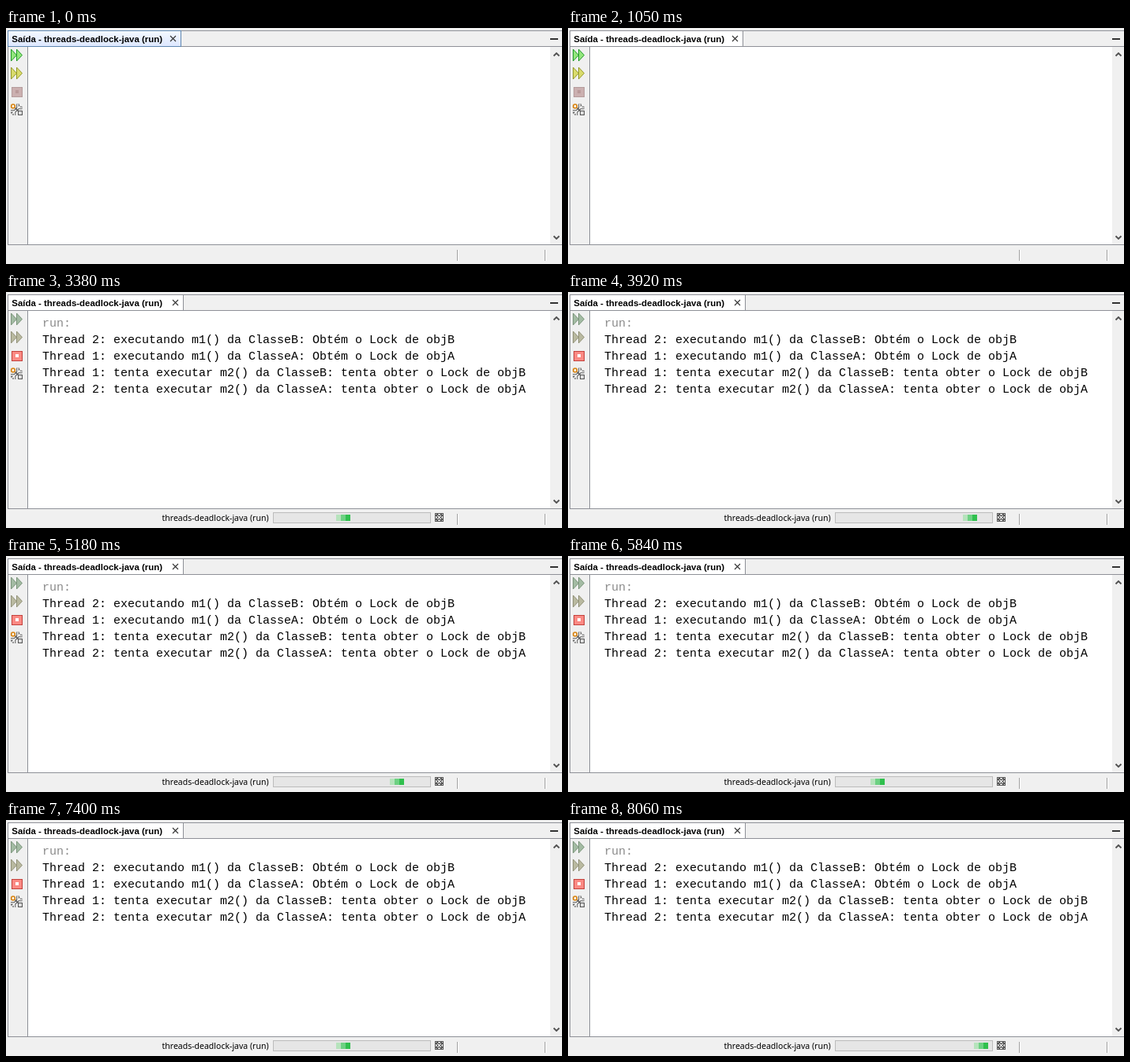
Write an HTML page that moves like this. It is 704 px wide and 300 px high and loops after 8120 ms.

```html
<!DOCTYPE html>
<html lang="pt">
<head>
<meta charset="utf-8">
<style>
  html, body { margin: 0; width: 100%; height: 100%; overflow: hidden; background: #f0f0f0; }
  svg { display: block; }
  text { white-space: pre; }
  .title { font: bold 11.45px Arial, "Liberation Sans", sans-serif; }
  .status { font: 10.5px "Noto Sans", "Open Sans", sans-serif; }
  .console { font: 15px "Courier New", "Liberation Mono", monospace; }
  .line { fill: #8e9097; }
  .go { fill: #92e67c; stroke: #1f9a28; }
  .again { fill: #d9db6c; stroke: #94992a; }
  .stop { fill: #cbb0b0; stroke: #b59c9c; }
  .hole { fill: #b99a9a; }
  .running .go { fill: #a3bba3; stroke: #7c957c; }
  .running .again { fill: #b9b9a0; stroke: #929279; }
  .running .stop { fill: #fa8a84; stroke: #c4413c; }
  .running .hole { fill: #fff; }
</style>
</head>
<body>
<svg id="stage" width="704" height="300" viewBox="0 0 704 300">
  <defs>
    <linearGradient id="focus" x2="0" y2="1">
      <stop stop-color="#f4f9ff"/><stop offset="1" stop-color="#dde7ff"/>
    </linearGradient>
    <clipPath id="track"><rect x="341" y="283" width="194" height="8"/></clipPath>
    <path id="forward" d="M6.5 .5L13.5 8L6.5 15.5ZM13.5 .5L20.5 8L13.5 15.5Z"/>
    <path id="wrench" d="M7.5 109.5L18 99M15 96.5V101.5H20.5M6 106H10.5V111"/>
    <path id="cross" d="M546 284L551 289M551 284L546 289"/>
  </defs>
  <rect width="704" height="300" fill="#f0f0f0"/>

  <!-- window frame -->
  <rect x="28" y="24" width="661" height="251" fill="#fff"/>
  <g class="line">
    <rect x="2" y="3" width="702" height="1"/>
    <rect x="2" y="3" width="1" height="273"/>
    <rect x="2" y="275" width="702" height="1"/>
    <rect x="27" y="24" width="1" height="251"/>
    <rect id="rule" y="23" height="1"/>
  </g>
  <path d="M571.5 282V296M682.5 282V296" stroke="#a0a0a0"/>
  <path d="M572.5 282V296M683.5 282V296" stroke="#fff"/>

  <!-- tab -->
  <rect id="tab" x="2.5" y="3.5" height="20"/>
  <text class="title" x="7.3" y="18">Saída - threads-deadlock-java (run)</text>
  <path id="close" d="M-3.5 -3.5L3.5 3.5M3.5 -3.5L-3.5 3.5" stroke="#333" stroke-width="1.1"/>
  <rect x="689" y="13" width="10" height="2" fill="#333"/>
  <path d="M693.5 35.5L697 32L700.5 35.5M693.5 264.5L697 268L700.5 264.5" fill="none" stroke="#505050" stroke-width="1.8"/>

  <!-- toolbar -->
  <use href="#forward" y="26.5" class="go"/>
  <use href="#forward" y="49.5" class="again"/>
  <rect class="stop" x="7.5" y="75.5" width="13" height="12"/>
  <rect class="hole" x="12" y="79" width="4" height="4"/>
  <g fill="none">
    <use href="#wrench" stroke="#555" stroke-width="3.6"/>
    <use href="#wrench" stroke="#f4f4f4" stroke-width="1.6"/>
    <path d="M11.5 101.5L16 106" stroke="#555" stroke-width="1.6"/>
    <rect x="15.5" y="105.5" width="5" height="5" fill="#ddd" stroke="#555"/>
    <circle cx="9" cy="99.5" r="2.3" fill="#fff" stroke="#d88a20" stroke-width="1.8"/>
  </g>

  <!-- console -->
  <rect id="caret" x="46" y="27" width="2" height="21"/>
  <g class="console">
    <text id="run" x="46" y="44" fill="#8a8a8a">run:</text>
    <g id="first">
      <text x="46" y="65">Thread 2: executando m1() da ClasseB: Obtém o Lock de objB</text>
      <text x="46" y="86">Thread 1: executando m1() da ClasseA: Obtém o Lock de objA</text>
    </g>
    <g id="second">
      <text x="46" y="107">Thread 1: tenta executar m2() da ClasseB: tenta obter o Lock de objB</text>
      <text x="46" y="128">Thread 2: tenta executar m2() da ClasseA: tenta obter o Lock de objA</text>
    </g>
  </g>

  <!-- progress -->
  <g id="progress">
    <text class="status" x="197.5" y="291">threads-deadlock-java (run)</text>
    <rect x="338.5" y="280.5" width="199" height="13" fill="#e6e6e6" stroke="#bcbcbc"/>
    <g clip-path="url(#track)">
      <g id="chunks">
        <rect x="-12" y="283" width="6" height="8" fill="#b6e3bc"/>
        <rect x="-6" y="283" width="6" height="8" fill="#6dd183"/>
        <rect y="283" width="6" height="8" fill="#30c04e"/>
      </g>
    </g>
    <rect x="543.5" y="281.5" width="10" height="10" fill="#f4f4f4" stroke="#555"/>
    <use href="#cross" stroke="#333" stroke-width="3.2" stroke-linecap="square"/>
    <use href="#cross" stroke="#f4f4f4" stroke-width="1.2"/>
  </g>
</svg>
<script>
  const LOOP = 8120, BLUR = 1050, START = 2780, STEP = 60;
  const el = id => document.getElementById(id);
  const show = (id, on) => el(id).setAttribute('visibility', on ? 'visible' : 'hidden');
  const set = (id, attrs) => {
    for (const key in attrs) el(id).setAttribute(key, attrs[key]);
  };

  function draw(t) {
    const running = t >= START, focused = t < BLUR;
    const right = running ? 224 : 221;
    el('stage').classList.toggle('running', running);
    set('tab', {
      width: right - 2,
      fill: focused ? 'url(#focus)' : '#fff',
      stroke: focused ? '#5f87b0' : '#8e9097'
    });
    set('rule', { x: right, width: 704 - right });
    set('close', { transform: `translate(${right - 9.5} 13.5)` });

    show('caret', t >= 330 && t < 790);
    show('run', running);
    show('first', t >= 3080);
    show('second', t >= 3320);
    show('progress', running);

    // the bar advances every 45 ms and is refreshed every 60 ms
    const elapsed = Math.max(0, Math.floor((t - START) / STEP) * STEP);
    const tick = Math.floor(1.5 + elapsed / 45) % 30;
    set('chunks', { transform: `translate(${Math.floor(334.15 + 6.86 * tick)} 0)` });
  }

  const begin = performance.now();
  function frame() {
    draw((performance.now() - begin) % LOOP);
    requestAnimationFrame(frame);
  }
  frame();
</script>
</body>
</html>
```
